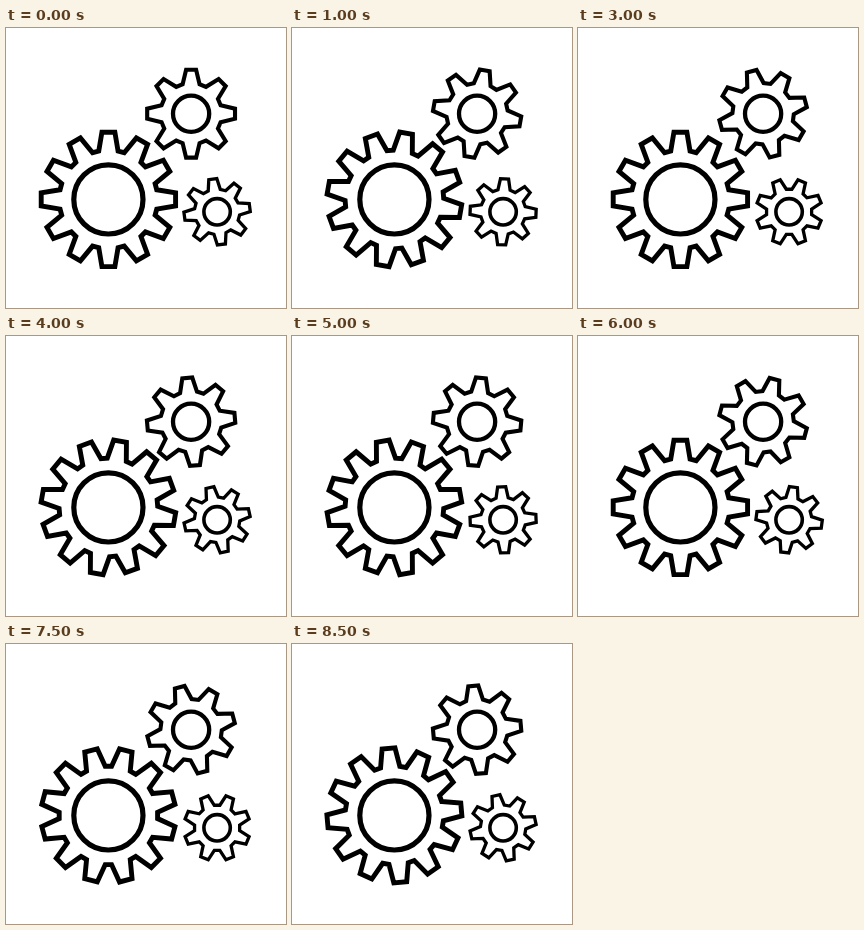
An HTML page that plays this animation: 280 px wide and 280 px high, repeating every 9 s.

```html
<!DOCTYPE html>
<html lang="en">
<head>
<meta charset="utf-8">
<title>Turning gears</title>
<style>
  html, body { margin: 0; width: 100%; height: 100%; overflow: hidden; background: #fff; }
  svg { display: block; width: 100%; height: 100%; }
  path, circle { fill: none; stroke: #000; }
</style>
</head>
<body>
<svg viewBox="0 0 280 280"></svg>
<script>
const LOOP = 9000, STEP = 500, STEP_ANGLE = 5;

// Angles are in degrees, clockwise from the top.
const gears = [
  { x: 102.4, y: 171.4, teeth: 12, tip: 67.5, tipHalf: 5.5, root: 49.3, rootHalf: 11.3,
    line: 4.9, hub: 34.6, hubLine: 5.2, start: 0 },
  { x: 185.1, y: 85.7, teeth: 8, tip: 44.2, tipHalf: 6.5, root: 30.7, rootHalf: 16,
    line: 4.1, hub: 18.1, hubLine: 4.3, start: 0 },
  { x: 211.1, y: 183.8, teeth: 8, tip: 33.2, tipHalf: 7, root: 22.7, rootHalf: 15.5,
    line: 3.3, hub: 13.2, hubLine: 3.6, start: -7.5 }
];

const svg = document.querySelector('svg');

function add(tag, attributes) {
  const node = document.createElementNS('http://www.w3.org/2000/svg', tag);
  for (const name in attributes) node.setAttribute(name, attributes[name]);
  return svg.appendChild(node);
}

function outline({ teeth, tip, tipHalf, root, rootHalf }) {
  const points = [];
  const corner = (radius, degrees) => {
    const a = degrees * Math.PI / 180;
    points.push(`${(radius * Math.sin(a)).toFixed(2)},${(-radius * Math.cos(a)).toFixed(2)}`);
  };
  for (let i = 0; i < teeth; i++) {
    const middle = i * 360 / teeth;
    corner(root, middle - rootHalf);
    corner(tip, middle - tipHalf);
    corner(tip, middle + tipHalf);
    corner(root, middle + rootHalf);
  }
  return `M${points.join('L')}Z`;
}

for (const gear of gears) {
  gear.rim = add('path', { d: outline(gear), 'stroke-width': gear.line });
  add('circle', { cx: gear.x, cy: gear.y, r: gear.hub, 'stroke-width': gear.hubLine });
}

function draw(now) {
  const turn = Math.floor((now % LOOP) / STEP) * STEP_ANGLE;
  for (const { rim, x, y, start } of gears) {
    rim.setAttribute('transform', `translate(${x} ${y}) rotate(${start + turn})`);
  }
}

const begin = performance.now();
function tick() {
  draw(performance.now() - begin);
  requestAnimationFrame(tick);
}
tick();
</script>
</body>
</html>
```
